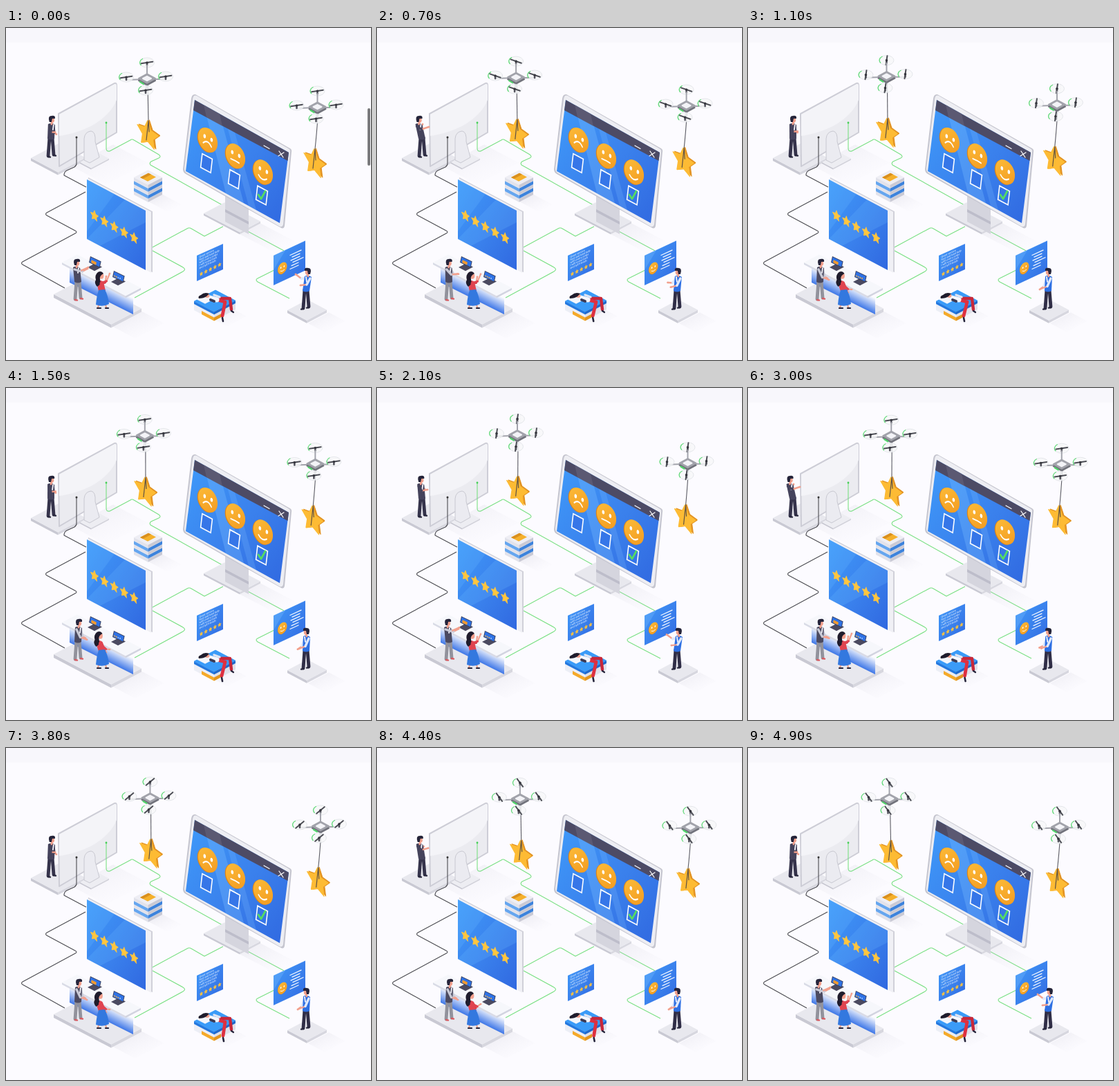
Recreate the animation shown at these times as an HTML page. Size 528 by 480 pixels, loop 5000 ms.

```html
<!DOCTYPE html>
<html lang="en">
<head>
<meta charset="utf-8">
<title>Customer feedback</title>
<style>
html, body { margin: 0; width: 100%; height: 100%; overflow: hidden; background: #fcfbff; }
svg { display: block; width: 528px; height: 480px; }
text { font-family: Lato, Inter, sans-serif; }
</style>
</head>
<body>
<svg viewBox="0 0 528 480" xmlns="http://www.w3.org/2000/svg">
  <defs>
    <linearGradient id="blue" x1="0" y1="0" x2="1" y2="1"><stop offset="0" stop-color="#3f9bfa"/><stop offset=".55" stop-color="#3a80ec"/><stop offset="1" stop-color="#3068e0"/></linearGradient>
    <linearGradient id="desk" gradientUnits="userSpaceOnUse" x1="138" y1="366" x2="127" y2="388"><stop offset=".1" stop-color="#f2f5fd"/><stop offset="1" stop-color="#2a69e5"/></linearGradient>
    <linearGradient id="shade" x1=".2" y1="0" x2=".9" y2=".8"><stop offset="0" stop-color="#c9c8d4" stop-opacity=".5"/><stop offset="1" stop-color="#e6e5ee" stop-opacity="0"/></linearGradient>
    <linearGradient id="gold" x1="0" y1="0" x2="1" y2="1"><stop offset="0" stop-color="#fdbd3a"/><stop offset="1" stop-color="#f2991f"/></linearGradient>
  </defs>
  <rect width="528" height="480" fill="#fcfbff"/>
  <rect width="528" height="21" fill="#f8f7fc"/>
  <g id="scene"></g>
  <g id="live"></g>
  <rect id="bar" x="523" y="116" width="4" height="83" rx="2" fill="#79797c"/>
</svg>
<script>
const LOOP = 5000, STEP = 100, TAU = Math.PI * 2, SLOPE = .525;

const $ = id => document.getElementById(id);
const range = (n, f) => Array.from({ length: n }, (_, i) => f(i));
const mix = (a, b, k) => a + (b - a) * k;
const ease = k => { k = Math.min(1, Math.max(0, k)); return k * k * (3 - 2 * k); };

const poly = (pts, fill, more = '') => `<polygon points="${pts}" fill="${fill}" ${more}/>`;
const line = (pts, color, w = 1) =>
  `<polyline points="${pts}" fill="none" stroke="${color}" stroke-width="${w}" stroke-linecap="round" stroke-linejoin="round"/>`;
const oval = (x, y, rx, ry, fill, more = '') => `<ellipse cx="${x}" cy="${y}" rx="${rx}" ry="${ry}" fill="${fill}" ${more}/>`;
const path = (d, fill, more = '') => `<path d="${d}" fill="${fill}" ${more}/>`;
const put = (m, x, y, body) => `<g transform="matrix(${m},${x},${y})">${body}</g>`;
const clear = a => `opacity="${a}"`;

// Upright panel from its top left corner; k is the slope of its top edge
const wall = (x, y, w, h, k, fill, more) => poly([x, y, x + w, y + w * k, x + w, y + w * k + h, x, y + h], fill, more);

// Floor rhombus from its left corner: w runs up right, d runs down right
function floor(x, y, w, d, fill, more) {
  const a = w * SLOPE, b = d * SLOPE;
  return poly([x, y, x + w, y - a, x + w + d, y - a + b, x + d, y + b], fill, more);
}
const slab = (x, y, w, d, h, top, left, right) =>
  wall(x, y, d, h, SLOPE, left) + wall(x + d, y + d * SLOPE, w, h, -SLOPE, right) + floor(x, y, w, d, top);
const plate = (x, y, w, d, h = 4) => slab(x, y, w, d, h, '#e8e8ee', '#c9c9d3', '#d7d7df');
const shadow = (x, y, w, d, a = .6) => floor(x, y, w, d, 'url(#shade)', clear(a));

function star(r, fill) {
  const pts = range(10, i => {
    const a = i * TAU / 10 - TAU / 4, k = i % 2 ? r * .5 : r;
    return [k * Math.cos(a), k * Math.sin(a)].map(v => v.toFixed(2));
  });
  return poly(pts.join(' '), fill, `stroke="${fill}" stroke-width="${r * .08}" stroke-linejoin="round"`);
}

function face(r, smile) {
  const e = r * .36, m = r * .42;
  return oval(-r * .08, r * .05, r, r, '#dd8416') + oval(0, 0, r, r, 'url(#gold)') +
    [-e, e].map(x => oval(x, -r * .18, r * .13, r * .17, '#fff')).join('') +
    path(`M${-m} ${m}Q0 ${m + r * smile} ${m} ${m}`, 'none', `stroke="#fff" stroke-width="${r * .12}" stroke-linecap="round"`);
}

function backMonitor() {
  const rim = 'stroke="#cdcdd6" stroke-width="2" stroke-linejoin="round"';
  return shadow(95, 200, 60, 50, .5) + plate(36, 188, 40, 39) +
    path('M76 124L157 80Q160 79 160 83V151L77 200Z', '#ebebf0', rim) +
    path('M77 125L157 81Q160 80 160 84V104C148 134 112 151 77 156Z', '#f4f4f8') +
    slab(107, 194, 26, 16, 2, '#ededf2', '#c6c6d0', '#d2d2da') +
    path('M113 191V160Q114 150 123 149Q130 150 129 164L135 187L121 195Z', '#ebebf1', 'stroke="#c4c4cd" stroke-width=".9"');
}

function wires() {
  const run = (d, c) => path(d, 'none', `stroke="${c}" stroke-width="1.1" stroke-linejoin="round"`);
  const green = 'M145 137V174Q145 179 150 178L180 162Q182 160 185 162L221 183Q225 186 221 188L210 193Q207 195 209 198L313 256' +
    'M212 317L262 290Q265 288 268 290L287 301L314 287M212 322L256 346Q261 349 256 352L186 390' +
    'M348 293L402 322M388 350L364 362Q360 364 364 367L410 391';
  const dark = 'M102 158V196Q102 199 99 201L88 206Q84 208 84 213L116 230' +
    'M115 237L59 267Q56 269 59 271L100 293Q104 295 100 297L24 338Q21 340 24 342L85 376';
  return run(green, '#79e083') + run(dark, '#4a4a50') + oval(145, 137, 1.4, 1.4, '#43cf55') + oval(102, 158, 1.5, 1.5, '#333');
}

function bigMonitor() {
  const skew = '.93,.5,-.13,1.1';
  const box = '<rect x="-7.8" y="-9" width="15.6" height="18" fill="#3676e8" stroke="#fff" stroke-width="1.6"/>';
  const row = (x, y, body) => range(3, i => put(skew, x + i * 40, y + i * 23.2, body(i))).join('');
  return shadow(338, 298, 30, 58, .5) + plate(286, 268, 30, 52, 3) +
    wall(317, 242, 34, 38, .53, '#d5d5de') + wall(317, 262, 34, 4, .53, '#bdbdca') +
    path('M274 96Q269 95 268 102L256 204Q256 209 260 211L398 289Q402 291 403 286L413 179Q414 175 409 173Z', '#c5c5cf') +
    path('M276 98Q271 96 270 103L258 203Q258 208 262 210L396 287Q400 288 401 284L411 179Q412 176 408 174Z', '#eeeef3') +
    poly('273,104 409,180 396,282 260,207', 'url(#blue)') +
    poly('286,111 309,124 344,253 318,239', '#7fc1ff', clear(.3)) +
    poly('316,128 326,133 362,263 351,257', '#7fc1ff', clear(.22)) +
    poly('273,104 409,180 407.5,192 271,119', '#4d4b65') +
    poly('286,111 309,124 313,142 290,129', '#6a6880', clear(.5)) +
    line('373,170 381,174.5', '#fff', 1.2) + line('395,178 401,187', '#fff', 1.2) + line('402,180 394,185', '#fff', 1.2) +
    row(292, 162, i => face(15, -.5 + i * .45)) + row(290, 195.5, () => box) +
    line('365,241 369,247 375,236', '#54dc62', 2.7);
}

function starScreen() {
  return wall(119, 216, 93, 88, .53, '#d0d0d9') + wall(118, 217, 92, 88, .53, '#f0f0f5') +
    wall(117, 219, 85, 86, .53, 'url(#blue)') +
    poly('117,219 157,240 117,294', '#70bcff', clear(.2)) +
    poly('172,248 202,264 202,281 136,315 117,305', '#70bcff', clear(.2)) +
    range(5, i => put('.85,.44,0,1.08', 128 + i * 14.3, 271.5 + i * 8, star(7.2, '#ffc53f'))).join('');
}

const laptop = (x, y) => floor(x - 4, y + 7, 11, 10, '#4b4a60') +
  put('.87,.42,-.2,.9', x, y - 9, '<rect width="18" height="10" fill="#39405f"/><rect x="1" y="1" width="16" height="8" fill="#2f72e5"/>');

const counter = () => shadow(155, 432, 42, 32) + plate(69, 385, 44, 83, 5) +
  wall(92, 345, 92, 23, .5, 'url(#desk)') + slab(81, 339, 22, 92, 3, '#f6f7fb', '#d9dbe6', '#d2d4e0') +
  laptop(122, 339) + laptop(156, 360);

function crate() {
  const layer = i => {
    const b = (4 - i) % 2, y = 236 - i * 5;
    return slab(185, y, 20.5, 20.5, 5, '#eeeef4', b ? '#66a6ef' : '#e2e2ea', b ? '#3d83dc' : '#cacad5');
  };
  return shadow(206, 251, 20, 28) + range(5, layer).join('') + floor(194, 216, 12, 11, '#f5b02c') + floor(194, 216, 12, 4, '#d98f1e');
}

function notes() {
  const words = ['Great service', 'Fast and kind help', 'with every order', 'I will come back', 'and tell friends'];
  const text = (w, i) => put('.9,-.42,0,1', 279.5, 332.5 + i * 4, `<text font-size="4.1" fill="#fff">${w}</text>`);
  const bar = i => {
    const x = 411 + i * 3 % 5, y = 328.5 + i * 4 - (x - 411) * .46, w = 16 - i * 5 % 7;
    return line([x, y, x + w, y - w * .46], '#f1f7ff', 1.3);
  };
  return wall(276, 329, 38, 37, -.45, 'url(#blue)') + words.map(text).join('') +
    range(5, i => put('.85,-.4,0,1', 282.5 + i * 6.6, 355.5 - i * 3.3, star(3.1, '#ffc33f'))).join('') +
    wall(387, 329, 46, 43, -.47, 'url(#blue)') + poly('387,329 405,320 387,350', '#8bc8ff', clear(.25)) +
    put('.9,-.4,0,1.1', 400, 347, face(7.3, .3)) + range(6, bar).join('') +
    shadow(437, 427, 30, 24, .55) + plate(407, 408, 29, 28);
}

const bed = () => shadow(302, 422, 28, 18, .5) + slab(272, 395, 31, 29, 13, '#2f93f5', '#eceef6', '#dfe1ea') +
  wall(283, 409, 18, 5, SLOPE, '#f5aa2a') + wall(301, 418.5, 10, 5, -SLOPE, '#e2951f') +
  slab(272, 395, 31, 29, 4, '#3a9bf8', '#2478df', '#2069cc') + floor(275, 392, 13, 13, '#f4f6fc');

function rotor(x, y, spin) {
  const c = Math.cos(spin) * 8.5, s = Math.sin(spin) * 6.5;
  return oval(x, y, 10.5, 7, '#f6f7f9', 'fill-opacity=".8" stroke="#dcdee2" stroke-width=".7"') +
    path(`M${x - 8.5} ${y + 4}A10.5 7 0 0 1 ${x - 6} ${y - 5.7}`, 'none', 'stroke="#62db79" stroke-width="1.2"') +
    line([x, y, x, y + 4], '#55555f', 2.6) + line([x - c, y - s, x + c, y + s], '#4c4d55', 2) + oval(x, y, 1.8, 1.6, '#35363d');
}

// Both drones circle slowly; the star below trails with its own drift
function drone(home, hook, drift, t) {
  const a = t / LOOP * TAU, sin = Math.sin(a), lag = 1 - Math.cos(a);
  const x = home[0] - 4 * sin + .5 * lag, y = home[1] - 1.3 * sin - 2.5 * lag;
  const sx = hook[0] - 4 * sin + drift * lag, sy = hook[1] - .8 * sin - 2.9 * lag;
  const top = sy - 20, spin = -t / STEP * TAU / 5 - .2;
  const hubs = [[0, -24], [-30, -3], [27, -4], [-2, 16]].map(([u, v]) => [x + u, y + v]);
  const arms = hubs.map(([u, v]) => line([x, y, u, v + 4], '#a3a4ac', 2)).join('');
  const rhomb = (w, h, dy, fill) => poly([x - w, y + dy, x, y + dy - h, x + w, y + dy, x, y + dy + h], fill,
    `stroke="${fill}" stroke-width="2" stroke-linejoin="round"`);
  const skew = '.85,.46,0,1.08';
  return rotor(...hubs[0], spin) + arms +
    path(`M${x + 1} ${y + 8}Q${(x + sx) / 2 + 1} ${(y + sy) / 2} ${sx + 1} ${top}`, 'none', 'stroke="#5c5c64" stroke-width="1.1"') +
    rhomb(12, 6.5, 2, '#72737c') + rhomb(12, 6.5, -1, '#a2a3ab') + rhomb(6, 3.2, -1, '#f3f3f7') +
    line([x - 10, y + 4, x - 5, y + 7], '#51d56b', 2.2) + hubs.slice(1).map(h => rotor(...h, spin)).join('') +
    put(skew, sx + 2.5, sy - .5, star(18.5, '#e39322')) + put(skew, sx, sy, star(18.5, '#fdbb34')) +
    line([sx - 2, sy + 8, sx + 1, top, sx + 2, sy - 4], '#5f5243', 1.2);
}

const skin = '#f2a08d', ink = '#25243a';

function arm(x, y, hand, bend, sleeve, w = 3.4) {
  const elbow = [(x + hand[0]) / 2 + bend, (y + hand[1]) / 2 + 4];
  return line([elbow, hand], skin, w * .7) + line([[x, y], elbow], sleeve, w) + oval(...hand, 1.4, 1.3, skin);
}

// lift blends from the resting pose (0) to the raised pose (1)
function man(p, lift) {
  const { x: hx, top, dir: d } = p, hy = top + 31, sy = top + 14, x = hx + mix(1, p.lean, lift);
  const hand = ([low, high]) => [hx + mix(low[0], high[0], lift), hy + mix(low[1], high[1], lift)];
  const leg = (s, fy) => line([hx + s * 2, hy, hx + s * 4, fy - 1], p.legs, 4.8) +
    line([hx + s * 4, fy, hx + s * 4 + d * 3, fy + .6], p.shoe, 2.4);
  return arm(x + d * 3, sy, hand(p.far), -d, p.sleeve) + leg(-1, top + 59) + leg(1, top + 57) +
    path(`M${x - 5} ${sy - 2}Q${x} ${sy - 5} ${x + 5} ${sy - 1}L${hx + 5} ${hy + 2}Q${hx} ${hy + 5} ${hx - 5} ${hy + 2}Z`, p.coat) +
    line([x + d * 3, sy - 1, x + d * 2, sy + 6], '#f4f4fa', 1.8) + line([x, sy - 2, x + d, sy - 6], skin, 2.8) +
    oval(x + d, top + 6, 3.2, 4, skin) +
    path(`M${x - 3 * d} ${top + 9}Q${x - 6 * d} ${top} ${x} ${top}Q${x + 6 * d} ${top - 1} ${x + 5 * d} ${top + 4}L${x + d} ${top + 4}L${x} ${top + 9}Z`, ink) +
    arm(x - d * 3, sy + 1, hand(p.near), -d * 2, p.sleeve);
}

const visitor = { x: 65, top: 127, dir: 1, lean: -4.5, legs: '#35334b', shoe: ink, coat: '#45435c', sleeve: '#45435c',
  near: [[6, -7], [10, -15]], far: [[8, -4], [1, -19]] };
const clerk = { x: 104, top: 334, dir: 1, lean: -2, legs: '#92929c', shoe: '#d95a60', coat: '#4b4a60', sleeve: '#c9cad6',
  near: [[13, -1], [15, -19]], far: [[11, -3], [14, -17]] };
const guide = { x: 434, top: 347, dir: -1, lean: 3, legs: '#302e47', shoe: ink, coat: '#2e70e3', sleeve: '#dfe9fb',
  near: [[-10, -1], [-8, -6]], far: [[-12, 0], [-15, -22]] };

function woman(lift) {
  const x = mix(134.5, 136, lift), hand = [150, mix(378, 355, lift)];
  return line('136,396 133,404', skin, 2.2) + line('143,395 145,404', skin, 2.2) +
    line('132,405 137,405', ink, 2.2) + line('144,405 148,405', ink, 2.2) +
    arm(x + 4, 369, [145, hand[1] + 4], 1, '#d63845', 3) +
    path(`M${x - 5} 367Q${x} 363 ${x + 5} 367L144 380L134 381Z`, '#e04450') +
    path('M134 379L143 378Q148 388 149 399Q140 404 130 400Q131 388 134 379Z', '#3378df') +
    oval(x + 2, 358.5, 3.4, 4.2, skin) +
    path(`M${x + 5} 355Q${x + 2} 350 ${x - 3} 353Q${x - 8} 357 ${x - 6} 364Q${x - 9} 369 ${x - 4} 374Q${x + 2} 371 ${x} 363Q${x - 1} 358 ${x + 5} 355Z`, '#1f1c2c') +
    arm(x + 1, 369, hand, 2, '#e04450', 3);
}

function sleeper(kick) {
  return line('310,391 324,391 326,407', '#c8283a', 4.4) + line('326,409 329,411', ink, 2.2) +
    line(`305,393 317,396 ${313 + kick},416`, '#de3040', 4.8) + line(`${313 + kick},419 ${314 + kick},424`, ink, 2.6) +
    line('294,390 305,393', '#f6f7fc', 7) + line('301,386 309,389', '#dfe3f0', 3.4) +
    oval(291, 387, 3.4, 3, skin) + path('M294 384Q287 381 282 386Q277 388 279 391Q286 391 290 388Z', '#1f1c2c') +
    line('296,393 301,395', '#3d3b55', 4);
}

function screens(t) {
  const lit = 2 + Math.floor(t / 500) % 3;
  return put('.9,.42,-.15,1', 127, 339, '<rect x="-4" y="-2" width="8" height="4" rx="1" fill="#f39b2d"/>') +
    range(4, i => oval(157 + i * 2.7, 358.5 + i * 1.2, 1, 1, i < lit ? '#f5ad3e' : '#9bc3fa')).join('');
}

$('scene').innerHTML = backMonitor() + wires() + bigMonitor() + crate() + starScreen() + counter() + notes() + bed();

function draw(t) {
  const a = t / LOOP * TAU, sin = Math.sin, cos = Math.cos;
  const point = ease(.25 + .8 * (cos(2 * a) + .6 * sin(a)));
  const think = ease(.5 - .4 * cos(4 * a) + .2 * sin(2 * a));
  const wave = ease(.7 - cos(2 * a - .56 * TAU));
  $('live').innerHTML = screens(t) + man(visitor, think) + man(clerk, point) + man(guide, point) +
    woman(wave) + sleeper(-sin(a)) +
    drone([204, 74], [205, 154], -.2, t) + drone([450.5, 115], [446, 195], .8, t);
  $('bar').setAttribute('opacity', Math.max(0, 1 - t / 400));
}

let last = -1;
const start = performance.now();
function tick() {
  const t = Math.floor((performance.now() - start) % LOOP / STEP) * STEP;
  if (t !== last) draw(last = t);
  requestAnimationFrame(tick);
}
tick();
</script>
</body>
</html>
```
